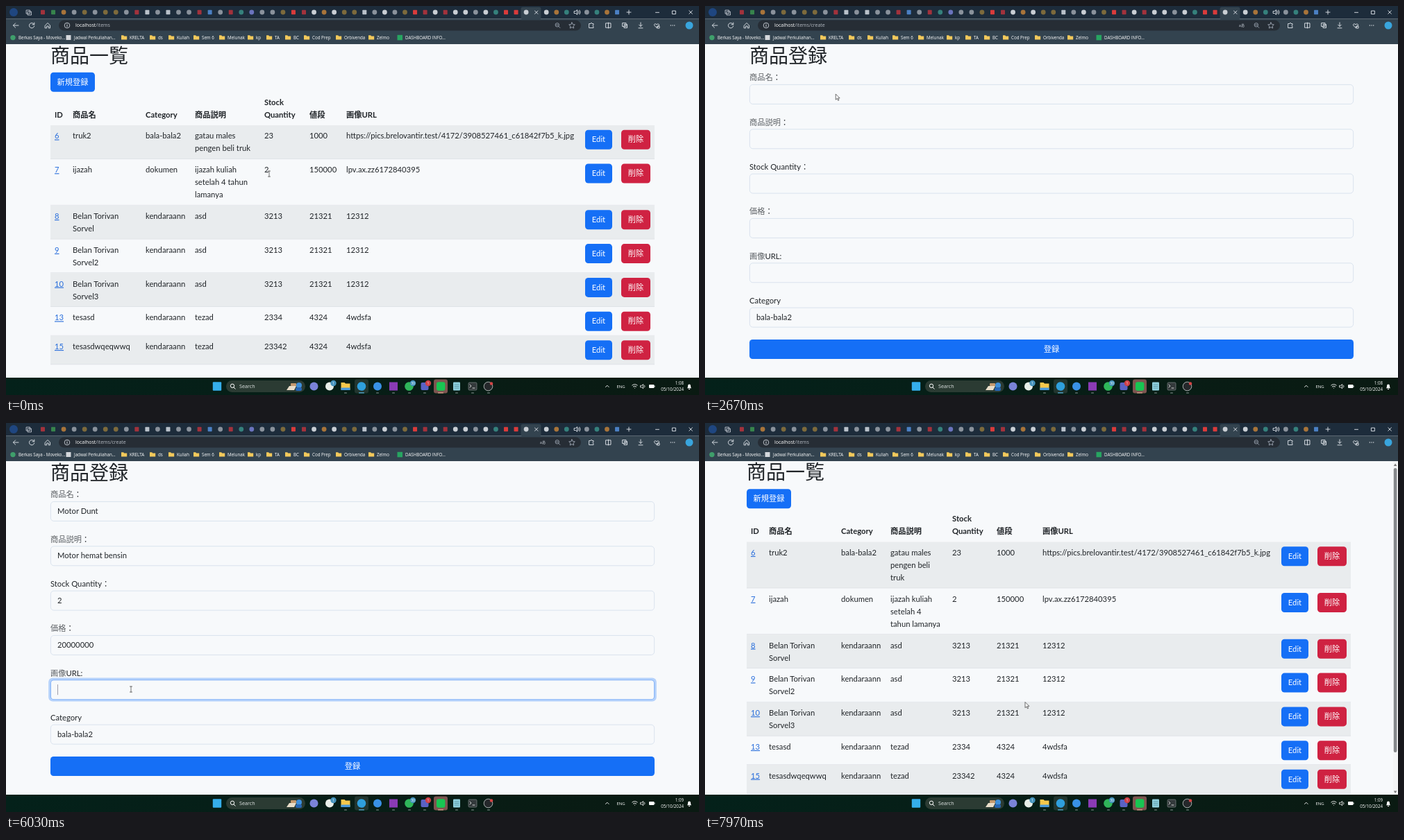
Write an HTML page that moves like this. It is 998 px wide and 561 px high and loops after 8 s.

```html
<!DOCTYPE html>
<html lang="ja">
<head>
<meta charset="utf-8">
<title>商品一覧</title>
<style>
  html, body { margin: 0; width: 100%; height: 100%; overflow: hidden; background: #f7f9fb; }
  svg { display: block; width: 100vw; height: 100vh; }
  text { font-family: Lato, "Noto Sans CJK JP", "Noto Sans CJK", sans-serif; white-space: pre; }
  .title { font-family: "Noto Sans CJK JP Light", "Noto Sans CJK JP", sans-serif; font-weight: 300; }
  .ui text { font-family: "Open Sans", "Noto Sans CJK JP", sans-serif; }
</style>
</head>
<body>
<svg viewBox="0 0 998 561">
  <defs>
    <linearGradient id="bar"><stop stop-color="#04211a"/><stop offset="1" stop-color="#0a1a12"/></linearGradient>
  </defs>
  <g id="page"></g>
  <g id="frame" class="ui"></g>
  <g id="status" class="ui"></g>
  <g id="pointer"></g>
</svg>
<script>
const LOOP = 8000, SIZE = 11.25;
const INK = '#212529', SOFT = '#5d6165', BLUE = '#156ff6', HOVER = '#0f5fd4', RED = '#cf2242', PALE = '#d6e0ec';
const IMAGE_URL = 'https://pics.brelovantir.test/4172/3908527461_c61842f7b5_k.jpg';

// Drawing helpers; text is placed by its vertical middle.
const rect = (x, y, w, h, fill, r = 0, more = '') =>
  `<rect x="${x}" y="${y}" width="${w}" height="${h}" rx="${r}" fill="${fill}" ${more}/>`;
const circle = (x, y, r, fill, more = '') => `<circle cx="${x}" cy="${y}" r="${r}" fill="${fill}" ${more}/>`;
const text = (x, y, s, size = SIZE, fill = INK, more = '') =>
  `<text x="${x}" y="${y + size * .35}" font-size="${size}" fill="${fill}" ${more}>${s}</text>`;
const stroke = (d, color = '#e4e8ee', width = .9) =>
  `<path d="${d}" fill="none" stroke="${color}" stroke-width="${width}" stroke-linecap="round" stroke-linejoin="round"/>`;
const shape = (d, fill, more = '') => `<path d="${d}" fill="${fill}" ${more}/>`;
const MIDDLE = 'text-anchor="middle"', END = 'text-anchor="end"', BOLD = 'font-weight="700"';

const ruler = document.createElement('canvas').getContext('2d');
const widthOf = s => {
  ruler.font = `${SIZE}px Lato, "Noto Sans CJK JP", sans-serif`;
  return ruler.measureText(s).width;
};
const button = (x, y, w, label, fill) =>
  rect(x, y, w, 28, fill, 4.5) + text(x + w / 2, y + 13.8, label, SIZE, '#fff', MIDDLE);
const title = (x, y, s) => text(x, y, s, 28, INK, 'class="title"');
const within = (t, a, b) => t >= a && t < b;
const progress = (t, a, b) => Math.min(1, Math.max(0, (t - a) / (b - a)));

// ---------- item list ----------
const WIDE = [70, 96, 201, 272, 372, 437, 490, 834, 886];
const NARROW = [66, 92, 196, 267, 356, 420, 486, 830, 882];
const HEADERS = ['ID', '商品名', 'Category', '商品説明', 'Quantity', '値段', '画像URL'];
const person = (id, suffix) =>
  [id, 'Belan Torivan|Sorvel' + suffix, 'kendaraann', 'asd', '3213', '21321', '12312'];
const itemRows = narrow => [
  ['6', 'truk2', 'bala-bala2', narrow ? 'gatau males|pengen beli|truk' : 'gatau males|pengen beli truk', '23', '1000', IMAGE_URL],
  ['7', 'ijazah', 'dokumen', narrow ? 'ijazah kuliah|setelah 4|tahun lamanya' : 'ijazah kuliah|setelah 4 tahun|lamanya', '2', '150000', 'lpv.ax.zz6172840395'],
  person('8', ''), person('9', '2'), person('10', '3'),
  ['13', 'tesasd', 'kendaraann', 'tezad', '2334', '4324', '4wdsfa'],
  ['15', 'tesasdwqeqwwq', 'kendaraann', 'tezad', '23342', '4324', '4wdsfa'],
];
const ROW_HEIGHT = { 1: 41.6, 2: 48.8, 3: 66.8 };

function selectedText(x, y, s, from, to) {
  const left = x + widthOf(s.slice(0, from)), part = s.slice(from, to);
  return rect(left, y - 9, widthOf(part), 18, '#2b62c6') +
    text(x, y, `${s.slice(0, from)}<tspan fill="#fff">${part}</tspan>${s.slice(to)}`);
}

// Stock cell selections, dragged from right to left.
function stockSelection(id, t) {
  if (id === '8' && within(t, 380, 1210)) return [Math.round(4 - 4 * progress(t, 380, 600)), 4];
  if (id === '10' && within(t, 1210, 2600)) return [Math.round(3 - 3 * progress(t, 1210, 1400)), 3];
}

function listPage(t, narrow) {
  const cols = narrow ? NARROW : WIDE, left = cols[0] - 6, lift = narrow ? -.5 : 0;
  const hover = within(t, 1780, 2500);
  let out = title(left, 72 + lift, '商品一覧') +
    button(left, 95.8 + lift, 64, '新規登録', hover ? HOVER : BLUE) +
    text(cols[4], 138.8 + lift, 'Stock', SIZE, INK, BOLD) +
    HEADERS.map((h, i) => text(cols[i], 156.8 + lift, h, SIZE, INK, BOLD)).join('');
  let y = 172 + lift;
  itemRows(narrow).forEach((row, index) => {
    const height = ROW_HEIGHT[Math.max(...row.map(c => c.split('|').length))];
    if (index % 2 === 0) out += rect(left, y, 870, height, '#e9ecee');
    out += rect(left, y + height - .8, 870, .8, '#dee2e6');
    row.forEach((cell, i) => {
      const range = i === 4 && !narrow && stockSelection(row[0], t);
      if (range && range[0] < range[1]) out += selectedText(cols[i], y + 15.5, cell, ...range);
      else cell.split('|').forEach((line, n) => {
        out += text(cols[i], y + 15.5 + n * 18, line, SIZE, i ? INK : '#2a6fdc', i ? '' : 'text-decoration="underline"');
      });
    });
    out += button(cols[7], y + 6.7, 39, 'Edit', BLUE) + button(cols[8], y + 6.7, 42, '削除', RED);
    y += height;
  });
  if (narrow) out += rect(991, 55, 7, 481, '#f3f4f5') + rect(991.8, 65, 4.6, 410, '#85888b', 2.3) +
    shape('M991.8 62l2.3-3.5 2.3 3.5zM991.8 530.5l2.3 3.5 2.3-3.5z', '#777');
  return out;
}

// ---------- create form ----------
const typed = (s, t, a, b) => s.slice(0, Math.floor(s.length * progress(t, a, b)));
function nameValue(t) {
  if (t < 3720) return typed('Motor Duns', t, 2800, 3600);
  return t < 3830 ? 'Motor Dun' : 'Motor Dunt';
}
const FIELDS = [
  { label: '商品名：', focus: [2700, 3950], value: nameValue },
  { label: '商品説明：', focus: [3950, 4700], value: t => typed('Motor hemat bensin', t, 4000, 4580) },
  { label: 'Stock Quantity：', focus: [4700, 5130], value: t => t < 4920 ? '' : '2', spinner: true },
  { label: '価格：', focus: [5130, 5750], value: t => typed('20000000', t, 5200, 5650), spinner: true },
  { label: '画像URL:', focus: [5750, 6420], value: t => t < 6050 ? '' : IMAGE_URL, filled: 6050 },
  { label: 'Category', focus: [6420, 7200], value: t => t < 6920 ? 'bala-bala2' : 'kendaraann', select: true },
];

function field(f, index, t) {
  const y = 113 + index * 64.35, mid = y + 14.2, value = f.value(t);
  const focused = within(t, ...f.focus);
  const back = t >= f.filled ? '#e8f0fe' : '#f7f9fb';
  const label = f.label.replace(/[一-龯]+/, `<tspan fill="${SOFT}">$&</tspan>`);
  let out = text(64, y - 9.6, label);
  if (focused) out += rect(61.2, y - 2.8, 875.6, 34, '#b5d2fb', 6, `opacity="${progress(t, f.focus[0], f.focus[0] + 70)}"`);
  out += rect(64.4, y + .4, 869.2, 28, back, 4.5, `stroke="${focused ? '#86b4f8' : PALE}" stroke-width="${focused ? 1.1 : .9}"`) +
    text(74, mid, value);
  if (focused && !f.select) out += rect(74 + widthOf(value), mid - 7.5, .7, 15, '#778');
  if (focused && f.spinner) out += shape(`M915 ${mid - 3}l3.2-5.2 3.2 5.2zM915 ${mid + 3}l3.2 5.2 3.2-5.2z`, '#666b70');
  return out;
}

function dropdown() {
  return `<g style="filter:drop-shadow(0 4px 5px #0005)">${rect(64.5, 465, 869, 60, '#f9fbfc', 2, 'stroke="#c3c7ca" stroke-width=".7"')}</g>` +
    rect(65, 465.5, 868, 20, '#737373') +
    ['bala-bala2', 'kendaraann', 'dokumen'].map((s, i) => text(74, 475.3 + i * 19.7, s, SIZE, i ? INK : '#fff')).join('');
}

function formPage(t) {
  const hover = within(t, 7130, 7650);
  return title(64, 72, '商品登録') + FIELDS.map((f, i) => field(f, i, t)).join('') +
    button(64, 481, 870, '登録', hover ? HOVER : BLUE) +
    (within(t, 6500, 6920) ? dropdown() : '');
}

// ---------- browser and desktop ----------
const TAB_COLORS = {
  R: '#a2323c', G: '#37844c', O: '#a8743a', g: '#8a929c', Y: '#7d6a3c', D: '#b9c1ca',
  B: '#4b80c4', P: '#6a73bd', T: '#35817c', S: '#d93b3b', W: '#c9ced4',
};
const TABS = 'RGOgYgYYgRDgDggRBgRTPggYSR' + 'WOWYYDgWgYSRWRWWgWTSSW-WOT-gTOB';
const BOOKMARKS = [[178, 'KRELTA'], [219, 'ds'], [246, 'Kuliah'], [282, 'Sem 6'], [319, 'Melunak'], [360, 'kp'],
  [387, 'TA'], [414, 'BC'], [441, 'Cod Prep'], [487, 'Orbivenda'], [534, 'Zelmo']];

function tabStrip() {
  let out = rect(0, 0, 998, 18.5, '#1d2c3b') + rect(741.5, 1.5, 29, 18, '#33434f', 3) +
    circle(11, 9, 6, '#1f4680') + stroke('M29.5 6h5v5h-5zM31.5 8h5v5h-5z', '#d5dae2', .8);
  [...TABS].forEach((key, i) => {
    const x = i < 26 ? 53 + 15.04 * i : 429 + 14.55 * (i - 25), color = TAB_COLORS[key];
    if (key === '-') return;
    out += 'DSGRB'.includes(key) ? rect(x - 3, 5.8, 6, 6.4, color, .8) : circle(x, 9, 3.4, color);
  });
  return out + stroke('M761.5 7l4.4 4.4m0-4.4l-4.4 4.4M894 9h6m-3-3v6M935.5 9.3h5M983.8 6.7l4.6 4.6m0-4.6l-4.6 4.6') +
    stroke('M959.8 7h4.6v4.6h-4.6zM818.5 7.5h1.8l2.2-2v7l-2.2-2h-1.8zM824.3 7q1.5 2 0 4M826 6q2.3 3 0 6');
}

function toolbar() {
  const star = 'M815 23.8l1.3 2.7 3 .4-2.2 2.1.6 3-2.7-1.4-2.7 1.4.6-3-2.2-2.1 3-.4z';
  return rect(0, 18.5, 998, 36.5, '#33434f') + rect(76, 20.5, 752, 15, '#262d35', 7.5) +
    stroke('M18 28h-7.6l3.2-3.2M10.4 28l3.2 3.2M56.5 28l3.5-3.6 3.5 3.6v3.8h-2.2v-2.8h-2.6v2.8h-2.2z') +
    circle(88, 28, 3.8, 'none', 'stroke="#dde2ea" stroke-width=".8"') + stroke('M88 27.5v2.3M88 26v.1') +
    circle(793.8, 27.3, 2.7, 'none', 'stroke="#aeb7c4" stroke-width=".8"') + stroke('M795.8 29.4l2 2M792.5 27.3h2.6', '#aeb7c4', .8) +
    stroke(star, '#aeb7c4', .8) +
    stroke('M840 25.5h2q1-3 2 0h2v2q-2.4 1 0 2v2h-6zM864 24.8h7v6.4h-7zM867.5 24v8M888 24.5h5v5h-5zM890 29.5v2h4.5v-5h-1.5M891 26v2.4m-1.2-1.2h2.4') +
    stroke('M914 23.8v5.5m-2.3-2.2l2.3 2.3 2.3-2.3M911 31.8h6M937 31.5l-3.5-3.8q0-3.2 3.5-1 3.5-2.2 3.5 1zM938 29h3v3h-3z') +
    [957.3, 960, 962.7].map(x => circle(x, 28, .7, '#e4e8ee')).join('') + circle(984, 28, 5.5, '#39a5dd');
}

function bookmarks() {
  const label = (x, s) => text(x, 45.6, s, 6.2, '#fff', 'font-weight="500"');
  const folder = x => shape(`M${x} 42.3h3.2l1 1.1h4v5.2h-8.2z`, '#f3c95b');
  return circle(10, 45.6, 3.7, '#3f9f6b') + label(18, 'Berkas Saya - Moveko...') +
    rect(86.5, 42, 7, 7, '#d5d8dc') + label(98, 'Jadwal Perkuliahan...') +
    BOOKMARKS.map(([x, s]) => folder(x - 12) + label(x, s)).join('') +
    rect(563.5, 41.8, 7.5, 7.5, '#27a561') + label(575, 'DASHBOARD INFO...');
}

function taskbar() {
  const badge = (x, s, fill) => circle(x, 544, 4.2, fill) + text(x, 544, s, 5, '#fff', MIDDLE);
  const y = 548.5;
  return rect(0, 536, 998, 25, 'url(#bar)') + rect(297.8, 542.3, 12.4, 12.4, '#35aeeb', 1) +
    rect(317, 540, 114, 17, '#2b3b33', 8.5) + circle(326, 547.8, 2.7, 'none', 'stroke="#fff" stroke-width="1"') +
    stroke('M328 550l2.2 2.2', '#fff', 1) + text(336, y, 'Search', 7.2, '#e3e8e7') +
    shape('M404 554l4-6h10l-3 6z', '#e8ddc9') + rect(410, 544, 8, 4, '#c59a70', 1) +
    circle(422, 547, 4, '#3e8fdb') + rect(417, 550, 9, 5, '#2766b5', 2) +
    circle(443.5, y, 6, '#7a83d8') + circle(466, y, 6, '#e8efe9') + badge(471.5, 1, '#4593bd') +
    shape('M482.5 543h5l1.5 1.6h6.5v9h-13z', '#f5c84c') + rect(482.5, 550.5, 13, 3.5, '#4a9bdc') +
    rect(502, 538.5, 20, 20, '#ffffff1c', 3) + circle(512, y, 6.3, '#2f9fdc') +
    circle(535, y, 6, '#3991e6') + rect(552, 542.5, 12, 12, '#8a3bb5') +
    circle(580.5, y, 6.3, '#2fb65a') + badge(586, 30, '#4593bd') +
    rect(597.5, 543, 11, 11, '#5a62c4', 2) + badge(608, 1, '#cf3f46') +
    rect(616, 538.5, 20, 20, '#7d5550', 3) + rect(620, 542.3, 12.4, 12.4, '#18c552', 3) +
    rect(644, 542.5, 10, 12, '#8fd0dd', 1) + stroke('M646 546h6m-6 2.5h6m-6 2.5h6', '#4b8798', .7) +
    rect(666, 543, 12, 11, '#33393b', 1.5, 'stroke="#a5adad" stroke-width=".5"') + stroke('M668 546l2 2-2 2m4 1h3', '#fff', .8) +
    circle(694.5, y, 6.3, '#25282b', 'stroke="#cfd4d4" stroke-width=".8"') + circle(699, 544.5, 2.2, '#d64545') +
    [489, 535, 558, 581, 603, 649, 672, 695].map(x => rect(x - 2, 557.5, 4, 1, '#8b9a97', .5)).join('') +
    rect(508, 557.3, 8, 1.2, '#58b4df', .6) + rect(622, 557.3, 8, 1.2, '#e0a48f', .6) +
    stroke('M863.5 549.5l2.3-2.3 2.3 2.3', '#fff') + text(885.5, y, 'ENG', 6, '#fff', MIDDLE) +
    stroke('M901.8 547q3.7-3 7.4 0M903.3 549q2.2-1.8 4.4 0M905.5 551v.1', '#fff') +
    stroke('M914 547.3h1.6l2-1.8v6.2l-2-1.8H914zM919.5 547q1.2 1.5 0 3', '#fff', .8) +
    rect(926, 546, 7.5, 5, '#fff', 1) + rect(933.5, 547.5, 1, 2, '#fff') +
    shape('M981 551.3q1-1 1-3.3 0-2.4 2-2.4t2 2.4q0 2.3 1 3.3zM983 552h2v1h-2z', '#fff');
}

function status(t) {
  const loading = within(t, 1960, 2420) || within(t, 7300, 7650);
  const path = within(t, 1960, 7300) ? '/items/create' : '/items';
  const reload = loading ? 'M34.8 25.6l4.8 4.8m0-4.8l-4.8 4.8' : 'M40.5 26.5a3.7 3.7 0 1 0 .3 2.4M40.8 24v2.8H38';
  return stroke(reload) +
    text(100, 28, `localhost<tspan fill="#b4bac2">${path}</tspan>`, 7, '#fff', 'font-weight="500"') +
    (onForm(t) ? text(773, 28, 'aあ', 5.5, '#c4cad3', MIDDLE) : '') +
    text(976, 544.3, t < 5900 ? '1:08' : '1:09', 6.2, '#fff', END) +
    text(976, 552.4, '05/10/2024', 6.2, '#fff', END);
}

// ---------- pointer ----------
const POINTERS = {
  beam: stroke('M-1.6-4h3.2M0-4v8M-1.6 4h3.2', '#555', .8),
  arrow: shape('M0 0v8.2l2-1.8 1.4 3 1.3-.6-1.4-2.9h2.6z', '#fff', 'stroke="#333" stroke-width=".7"'),
  hand: shape('M-1 0q1-1.2 2 0v4l4 1q1 .4.8 2l-.8 4.5h-5L-3.6 7q0-1.6 2.6 0z', '#fff', 'stroke="#222" stroke-width=".8"'),
};
// time, x, y, look from then on
const PATH = [
  [0, 379, 242, 'beam'], [350, 398, 303, 'beam'], [600, 372, 303, 'beam'], [800, 374, 304, 'arrow'],
  [1100, 392.5, 402.5, 'arrow'], [1200, 392, 402, 'beam'], [1420, 373, 402, 'arrow'],
  [1780, 118, 116, 'hand'], [1900, 113, 112, 'hand'], [2420, 113, 112, 'arrow'],
  [2680, 188.5, 127, 'beam'], [3800, 188.5, 127, 'beam'], [3930, 185, 191, 'beam'], [4560, 185, 191, 'beam'],
  [4690, 183, 255, 'beam'], [4980, 183, 255, 'beam'], [5110, 182, 320, 'beam'], [5640, 182, 320, 'beam'],
  [5740, 180, 384, 'beam'], [6100, 180, 384, 'arrow'], [6420, 159, 454, 'arrow'], [6700, 159, 454, 'arrow'],
  [6880, 150, 494, 'arrow'], [6960, 150, 494, 'arrow'], [7130, 270, 494, 'hand'], [7400, 300, 492, 'hand'],
  [7650, 380, 450, 'arrow'], [7920, 461, 402.5, 'arrow'],
];
function pointer(t) {
  const next = PATH.findIndex(p => p[0] > t);
  const b = PATH.at(next), a = next > 0 ? PATH[next - 1] : b;
  const k = a === b ? 0 : progress(t, a[0], b[0]), ease = k * k * (3 - 2 * k);
  const at = i => a[i] + (b[i] - a[i]) * ease;
  return `<g transform="translate(${at(1)} ${at(2)})">${POINTERS[a[3]]}</g>`;
}

// ---------- playback ----------
const onForm = t => within(t, 2420, 7650);
const shown = {};
function show(id, markup) {
  if (shown[id] !== markup) document.getElementById(id).innerHTML = shown[id] = markup;
}
const start = performance.now();
function draw() {
  const t = (performance.now() - start) % LOOP;
  show('page', onForm(t) ? formPage(t) : listPage(t, t >= 7650));
  show('status', status(t));
  show('pointer', pointer(t));
  requestAnimationFrame(draw);
}
show('frame', tabStrip() + toolbar() + bookmarks() + taskbar());
draw();
</script>
</body>
</html>
```
